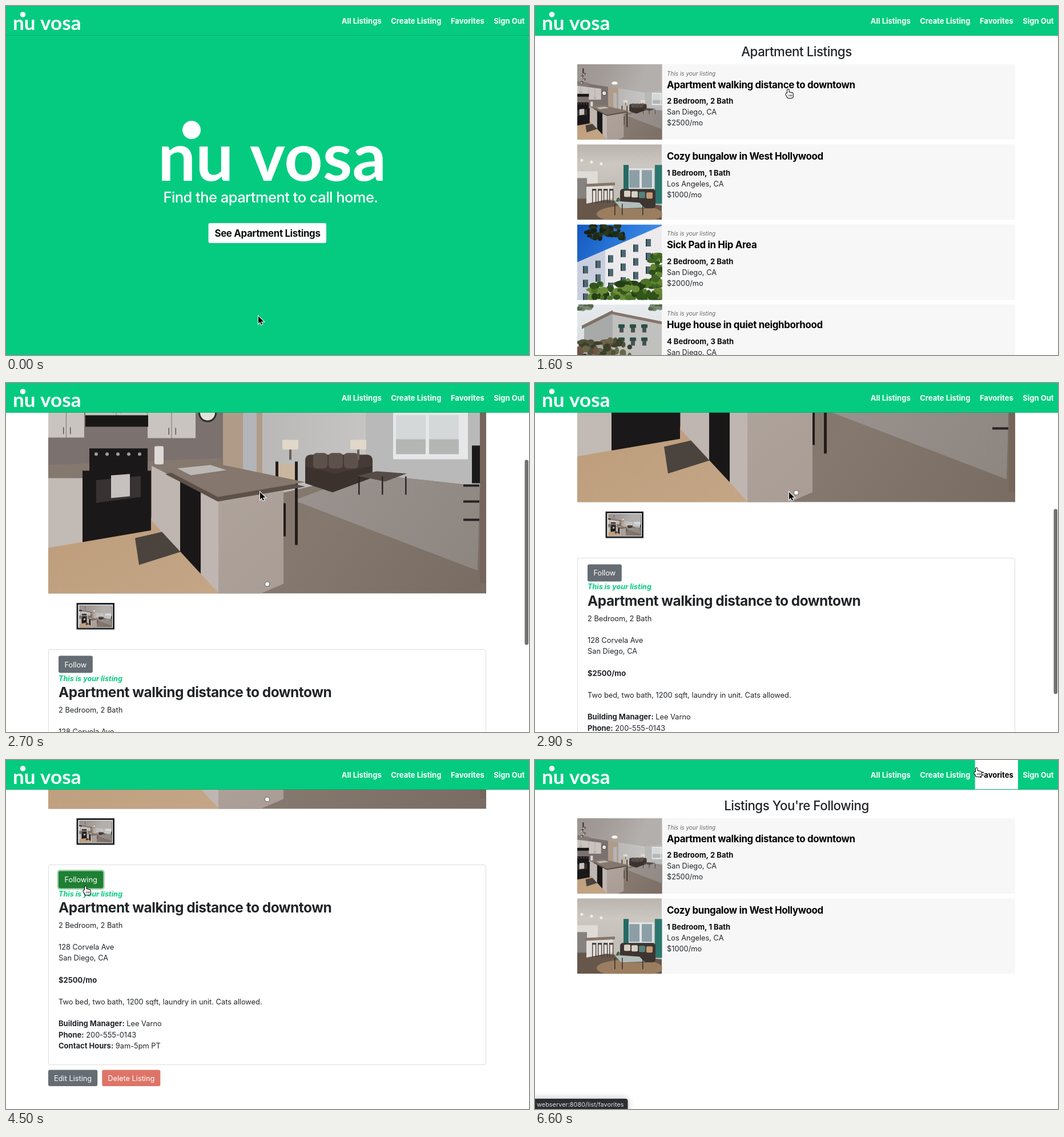
Animation of 916 by 611 pixels, one loop 6900 ms. Source, as an HTML page with a canvas:

```html
<!DOCTYPE html>
<html lang="en">
<head>
<meta charset="utf-8">
<title>Apartment listings walkthrough</title>
<style>
  html, body { margin: 0; width: 100%; height: 100%; overflow: hidden; background: #fff; }
  canvas { display: block; width: 916px; height: 611px; }
</style>
</head>
<body>
<canvas id="stage" width="916" height="611"></canvas>
<script>
const ctx = document.getElementById('stage').getContext('2d');
const W = 916, H = 611, MID = 458;
const LOOP = 6900, TICK = 100, SCROLL_END = 528;
const GREEN = '#04cb80', INK = '#212529', GRAY = '#656c73';

// ---------- drawing helpers ----------
function rect(fill, x, y, w, h, r = 0) {
  ctx.fillStyle = fill;
  ctx.beginPath();
  ctx.roundRect(x, y, w, h, r);
  ctx.fill();
}

function poly(fill, ...pts) {
  ctx.fillStyle = fill;
  ctx.beginPath();
  for (let i = 0; i < pts.length; i += 2) ctx.lineTo(pts[i], pts[i + 1]);
  ctx.fill();
}

function oval(fill, x, y, rx, ry = rx) {
  ctx.fillStyle = fill;
  ctx.beginPath();
  ctx.ellipse(x, y, rx, ry, 0, 0, Math.PI * 2);
  ctx.fill();
}

// Edges are functions of x; a slab is the area between two of them.
const slope = (y, k = 0) => x => y + k * x;
const slab = (fill, x0, x1, top, bottom) =>
  poly(fill, x0, top(x0), x1, top(x1), x1, bottom(x1), x0, bottom(x0));

function fade(w, h, ...colors) {
  const g = ctx.createLinearGradient(0, 0, w, h);
  colors.forEach((c, i) => g.addColorStop(i / (colors.length - 1), c));
  return g;
}

function leaves(colors, count, x, y, w, h, size) {
  let seed = count * 9973;
  const rnd = () => (seed = seed * 16807 % 2147483647) / 2147483647;
  for (let i = 0; i < count; i++) {
    oval(colors[i % colors.length], x + rnd() * w, y + rnd() * h, size * (0.5 + rnd()), size * (0.4 + rnd() * 0.7));
  }
}

// Draws text centred on cy by cap height and returns its width.
function text(str, x, cy, { size = 12.8, weight = 400, color = INK, align = 'left', style = 'normal', track = 0 } = {}) {
  ctx.font = `${style} ${weight} ${size}px Inter, sans-serif`;
  ctx.letterSpacing = `${track * size}px`;
  ctx.textAlign = align;
  ctx.fillStyle = color;
  ctx.fillText(str, x, cy + size * 0.36);
  const width = ctx.measureText(str).width;
  ctx.letterSpacing = '0px';
  return width;
}

const display = (str, x, y, size, options) => text(str, x, y, { size, weight: 700, track: -0.02, ...options });
const heading = (str, y) => display(str, MID, y, 22.3, { weight: 500, align: 'center' });
const strong = (str, x, y, color = INK) => text(str, x, y, { size: 13, weight: 700, color });

function photo(draw, x, y, w, h, scale = 1, shift = 0) {
  ctx.save();
  ctx.beginPath();
  ctx.rect(x, y, w, h);
  ctx.clip();
  ctx.translate(x - shift, y);
  ctx.scale(scale, scale);
  draw();
  ctx.restore();
}

// ---------- photos ----------
function kitchen() {
  const eave = slope(105, 0.157), skirting = slope(432, -0.232);
  const toe = slope(433, -0.17), backSkirting = slope(242, 0.11);

  // shell of the room
  rect(fade(500, 200, '#9a928e', '#a29b97', '#b3afac'), 0, 0, 767, 513);
  rect(fade(767, 513, '#81746a', '#81746a', '#85786e', '#786c63'), 0, 310, 767, 203);
  poly(fade(300, 513, '#b3906d', '#c4a686'), 0, 400, 180, 380, 300, 490, 300, 513, 0, 513);
  slab('#7b716e', 0, 306, eave, slope(310));
  slab('#2c2423', 0, 66, eave, slope(140));
  slab('#857a76', 66, 175, slope(100, 0.15), slope(158));
  slab('#b09b89', 306, 375, eave, slope(320));
  rect('#b3b5b8', 341, 195, 24, 110);
  slab(fade(556, 0, '#aaa8a7', '#b3b1b0', '#c6c5c4'), 375, 556, eave, skirting);
  slab('#b9b9ba', 556, 756, slope(253, -0.11), backSkirting);
  poly(fade(767, 470, '#aaa39f', '#9d9692', '#8d8580'), 430, 350, 556, 303, 756, 325, 752, 473);
  rect('#75655a', 756, 33, 11, 462);

  // window
  rect('#e6e7e8', 604, 194, 131, 84);
  for (const x of [609, 667]) {
    rect('#d5d8d8', x, 201, 52, 68);
    rect('#b4b6b4', x, 243, 52, 26);
  }

  // wall cabinets, two doors each
  for (const [x, end, bottom] of [[0, 64, 240], [65, 174, 203], [174, 259, 241]]) {
    const half = (end - x) / 2;
    for (const left of [x, x + half]) slab('#c9c4c0', left, left + half - 1, slope(133, 0.13), slope(bottom));
    for (const side of [-6, 6]) rect('#5c5552', x + half + side, bottom - 18, 1.5, 12);
  }
  rect('#191616', 65, 201, 110, 20);

  // counter, base units and stove
  slab('#85786f', 0, 304, slope(288, -0.04), slope(312, -0.06));
  slab('#c2bab5', 0, 60, slope(311), toe);
  rect('#dcd9d6', 186, 255, 16, 32, 3);
  slab('#1b1819', 60, 180, slope(298), toe);
  rect('#1b1819', 72, 259, 102, 40);
  for (let i = 0; i < 5; i++) oval('#a29b98', 84 + i * 19, 269, 3);
  slab('#383332', 84, 162, slope(322, -0.09), slope(365, -0.13));
  slab('#c6c1be', 110, 143, slope(315, -0.08), slope(357, -0.1));
  poly('#4b433d', 152, 416, 213, 402, 232, 440, 159, 463);

  // sofa, lamps, table and television
  rect('#453a35', 450, 270, 118, 40, 9);
  poly('#3b322e', 450, 290, 500, 303, 567, 290, 563, 312, 498, 336, 450, 320);
  for (let i = 0; i < 3; i++) rect('#5c514b', 464 + i * 27, 267, 25, 27, 6);
  for (const x of [424, 543]) {
    rect('#e2d8c9', x - 14, 244, 28, 17, 2);
    rect('#6d5f58', x - 2, 261, 4, 18);
  }
  poly('#554c48', 541, 307, 575, 299, 628, 303, 590, 317);
  for (let i = 0; i < 3; i++) rect('#2c2626', 543 + i * 41, 308, 2.5, 32);
  rect('#1b1a1b', 742, 254, 14, 66);
  for (const y of [322, 350, 382]) slab('#272223', 727, 755, slope(y), slope(y + 4));

  // chair behind the island
  rect('#c9b69f', 402, 286, 33, 28);
  for (const x of [398, 432]) rect('#221c1b', x, 282, 5, x > 400 ? 146 : 40);
  rect('#221c1b', 412, 355, 4, 58);

  // island
  const rim = slope(197, 0.51), base = slope(190, 1.08);
  slab('#bfb6b1', 181, 298, rim, base);
  slab('#1a1718', 231, 267, rim, base);
  slab(fade(412, 500, '#bab0a9', '#a99d96'), 298, 412, slope(410, -0.2), slope(673, -0.43));
  for (const [color, drop] of [['#5c5049', 8], ['#85776d', 0]]) {
    poly(color, 205, 296 + drop, 292, 285, 450, 318 + drop, 297, 344 + drop);
  }
  poly('#bdb8b4', 226, 294, 284, 288, 312, 297, 250, 306);

  // light fittings and clock
  oval('#e9dfd2', 350, 129, 21, 11);
  oval('#fff9ee', 350, 126, 17, 7);
  rect('#332d2b', 132, 28, 8, 50);
  for (let i = 0; i < 4; i++) {
    const x = i % 2 ? 128 : 143, y = 65 + i * 19;
    oval('#6a615b', x, y, 11, 9);
    oval('#e6ddd0', x - 4, y + 4, 5, 4);
  }
  oval('#302b2a', 279, 197, 16);
  oval('#e5e1dd', 279, 197, 13);
}

function lounge() {
  rect(fade(0, 70, '#bab4ae', '#ccc7c1', '#c4beb8'), 0, 0, 148, 132);
  slab('#67574b', 0, 148, slope(92, 0.1), slope(132));
  rect('#dfdbd6', 0, 47, 36, 24);
  rect('#85827f', 0, 59, 17, 36);
  slab('#e1ddd8', 16, 62, slope(71, -0.06), slope(107, -0.2));
  slab('#86776a', 14, 66, slope(70, -0.05), slope(75, -0.05));
  for (let x = 26; x < 60; x += 10) {
    rect('#433a35', x, 78, 7, 3);
    for (const leg of [0, 6]) rect('#433a35', x + leg, 78, 1.3, 25);
  }
  for (let i = 0; i < 3; i++) oval('#f5eee1', 8 + i * 17, 28 + i * 3, 2.5);
  rect('#e2e5e5', 88, 42, 46, 36);
  for (const x of [91, 113]) rect('#8c9fa7', x, 45, 18, 31);
  for (const x of [81, 136]) rect(fade(148, 0, '#1d5b55', '#2b786f'), x, 36, x - 72, 68);
  oval('#9b7e60', 92, 122, 58, 15);
  rect('#3d3531', 75, 78, 62, 34, 5);
  ['#d8cfc2', '#d8cfc2', '#56807b', '#c89a78'].forEach((color, i) => rect(color, 82 + i * 13, 81 + i, 11, 11, 2));
  poly('#b3bebc', 65, 99, 109, 102, 118, 111, 77, 112);
  for (const x of [65, 78, 114]) rect('#332e2b', x, 104, 1.5, 20);
  leaves(['#41613d'], 5, 70, 94, 5, 5, 2);
}

function villa() {
  const roof = slope(66, -0.43), sky = fade(148, 80, '#1559bd', '#2b79dc', '#5499e7');
  rect(sky, 0, 0, 148, 132);
  slab('#c9cede', 0, 49, roof, slope(132));
  slab('#eceaed', 49, 148, roof, slope(132));
  for (let i = 0; i < 18; i++) {
    const x = 12 + i % 6 * 22, y = roof(x) + 12 + Math.floor(i / 6) * 24;
    rect('#4f6870', x, y, 7, 13);
    rect('#243f3d', x - 2, y, 2, 13);
  }
  leaves(['#1d2b19', '#29371d', '#182114'], 42, 17, 2, 64, 24, 5);
  leaves(['#32551a', '#4d7425', '#253f15', '#6b8c38'], 85, 25, 100, 120, 32, 7);
  leaves(['#2e501b', '#63832f', '#3f6522'], 45, 130, 52, 20, 80, 6);
}

function house() {
  rect(fade(0, 90, '#e7ebed', '#d5dadd'), 0, 0, 148, 132);
  slab('#a7aaa9', 12, 62, slope(44, -0.5), slope(132));
  slab('#c0c1be', 62, 148, slope(4, 0.2), slope(132));
  slab('#7f7069', 8, 62, slope(41, -0.5), slope(47, -0.5));
  slab('#85746a', 62, 148, slope(0, 0.2), slope(5, 0.2));
  for (let i = 0; i < 6; i++) {
    const x = 74 + i % 3 * 20, y = 35 + Math.floor(i / 3) * 23;
    rect('#4a5150', x, y, 7, 14);
    rect('#284f48', x - 2, y, 11, 6);
  }
  for (const x of [0, 125]) leaves(['#53664c', '#7a8874'], 16, x, 0, 24, 8, 4);
  leaves(['#52503a', '#3c3f2a', '#6a6748', '#705443'], 70, 0, 60, 92, 50, 7);
}

// ---------- interface ----------
function logo(x, y, scale) {
  ctx.save();
  ctx.translate(x, y);
  ctx.scale(scale, scale);
  oval('#fff', 72, 15, 16);
  ctx.font = '700 117.5px Lato, sans-serif';
  ctx.textAlign = 'left';
  ctx.fillText('nu vosa', 13, 104);
  ctx.restore();
}

function header(favoritesHover) {
  const gap = 16.5;
  rect(GREEN, 0, 0, W, 52);
  logo(8, 10.5, 0.299);
  let right = 908.5;
  for (const label of ['Sign Out', 'Favorites', 'Create Listing', 'All Listings']) {
    const lit = favoritesHover && label === 'Favorites';
    ctx.font = '700 13px Inter, sans-serif';
    const left = right - ctx.measureText(label).width;
    if (lit) rect('#fff', left - gap / 2, 0, right - left + gap, 51);
    strong(label, left, 26, lit ? '#000' : '#fff');
    right = left - gap;
  }
  rect('rgba(0,0,0,.14)', 0, 51, W, 1);
}

function button(label, fill, x, y, h, pad, glow) {
  ctx.font = '400 12.8px Inter, sans-serif';
  const w = ctx.measureText(label).width + pad * 2;
  if (glow) rect(glow, x - 2.5, y - 2.5, w + 5, h + 5, 5);
  rect(fill, x, y, w, h, 3);
  text(label, x + pad, y + h / 2 + 0.3, { color: '#fff' });
  return x + w;
}

function home() {
  rect(GREEN, 0, 0, W, H);
  header(false);
  logo(253, 202, 1);
  display('Find the apartment to call home.', 463.5, 335, 25.45, { weight: 500, color: '#fff', align: 'center' });
  rect('#fff', 354.5, 380, 206.5, 35, 3);
  display('See Apartment Listings', MID, 397.5, 16.85, { color: '#0c0f11', align: 'center' });
}

const listings = [
  { draw: kitchen, scale: 132 / 513, shift: 24.6, own: true, title: 'Apartment walking distance to downtown', rooms: '2 Bedroom, 2 Bath', city: 'San Diego, CA', price: '$2500/mo' },
  { draw: lounge, title: 'Cozy bungalow in West Hollywood', rooms: '1 Bedroom, 1 Bath', city: 'Los Angeles, CA', price: '$1000/mo' },
  { draw: villa, own: true, title: 'Sick Pad in Hip Area', rooms: '2 Bedroom, 2 Bath', city: 'San Diego, CA', price: '$2000/mo' },
  { draw: house, own: true, title: 'Huge house in quiet neighborhood', rooms: '4 Bedroom, 3 Bath', city: 'San Diego, CA', price: '$4000/mo' }
];

function listPage(title, count) {
  heading(title, 80);
  listings.slice(0, count).forEach((item, i) => {
    const top = 102 + i * 140.2, y = item.own ? top : top - 14.5;
    rect('#f7f7f7', 74, top, 767, 132);
    photo(item.draw, 74, top, 148.5, 132, item.scale, item.shift);
    if (item.own) text('This is your listing', 231, top + 16, { size: 10, style: 'italic', color: '#6a6a6a' });
    display(item.title, 231, y + 35.5, 16.85, { color: '#000' });
    strong(item.rooms, 231, y + 64.5, '#0b0b0b');
    text(item.city, 231, y + 83.5);
    text(item.price, 231, y + 102.5);
  });
}

// Each line is a bold part followed by a regular part.
const details = [
  ['', '2 Bedroom, 2 Bath'], [],
  ['', '128 Corvela Ave'], ['', 'San Diego, CA'], [],
  ['$2500/mo'], [],
  ['', 'Two bed, two bath, 1200 sqft, laundry in unit. Cats allowed.'], [],
  ['Building Manager:', 'Lee Varno'], ['Phone:', '200-555-0143'], ['Contact Hours:', '9am-5pm PT']
];

function profilePage(scroll, following, hover) {
  ctx.save();
  ctx.translate(0, SCROLL_END - scroll);
  heading('Apartment Profile', 79 - SCROLL_END);
  photo(kitchen, 74, 100.5 - SCROLL_END, 767, 513);
  ctx.shadowColor = '#000';
  ctx.shadowBlur = 2;
  text('1 of 1', 838, 112 - SCROLL_END, { size: 8.6, color: '#fff', align: 'right' });
  oval('#fff', 457.5, 69, 3.5);
  ctx.shadowBlur = 0;

  rect(INK, 123.5, 102, 66.5, 46.5);
  rect('#fff', 126.5, 105, 60.5, 40.5);
  photo(kitchen, 128, 106, 58, 38.5, 58 / 767);

  rect('#dedede', 74, 183, 767, 351, 4);
  rect('#fff', 75, 184, 765, 349, 3);
  if (following) button('Following', hover ? '#1f7f33' : '#28a745', 92, 194.5, 30, 10.5, '#a3d6ae');
  else button('Follow', hover ? '#5a6268' : GRAY, 92, 194.5, 30, 10.5);
  text('This is your listing', 92, 234, { size: 12.6, weight: 700, style: 'italic', color: GREEN });
  display(listings[0].title, 92, 258.5, 24.45);
  details.forEach(([bold, plain], i) => {
    const y = 289 + i * 19.2;
    const indent = bold ? strong(bold, 92, y) + 3.6 : 0;
    if (plain) text(plain, 92 + indent, y);
  });
  const editEnd = button('Edit Listing', GRAY, 74, 542.5, 28.5, 10);
  button('Delete Listing', '#de7468', editEnd + 8, 542.5, 28.5, 10);
  ctx.restore();
}

function statusBar() {
  ctx.shadowColor = 'rgba(0,0,0,.3)';
  ctx.shadowBlur = 12;
  rect('#2b2e31', -5, 593, 167.5, 24, 4);
  ctx.shadowBlur = 0;
  text('webserver:8080/list/favorites', 3, 603, { size: 10.95, color: '#dcdee0' });
}

const ARROW = new Path2D('M0 0V13L3 10L5 15L7 14L5 9.500H9.500Z');
const HAND = new Path2D();
HAND.roundRect(-1, 0, 2.6, 11, 1.3);
for (let i = 0; i < 3; i++) HAND.roundRect(1.4 + i * 2.4, 5 + i * 0.6, 2.5, 8, 1.2);
HAND.roundRect(-1.5, 8, 10, 7, 3);
HAND.roundRect(-3.5, 7, 3, 4, 1.4);

function pointer(x, y, hand) {
  const shape = hand ? HAND : ARROW;
  ctx.save();
  ctx.translate(x, y);
  ctx.lineWidth = 2;
  ctx.strokeStyle = hand ? '#000' : '#fff';
  ctx.fillStyle = hand ? '#fff' : '#000';
  ctx.stroke(shape);
  ctx.fill(shape);
  if (hand) for (let i = 0; i < 3; i++) rect('#000', 1.5 + i * 2.4, 9, 0.8, 3.5);
  ctx.restore();
}

// ---------- timeline ----------
const START = [442, 543];
const moves = [
  { from: 400, to: 800, spot: [444, 398] },
  { from: 1100, to: 1600, spot: [443, 146] },
  { from: 1800, to: 2300, spot: [445, 191] },
  { from: 3700, to: 4400, spot: [139, 221] },
  { from: 4700, to: 5600, spot: [773, 14] }
];

const progress = (t, from, to) => Math.min(1, Math.max(0, (t - from) / (to - from)));

function pointerAt(t) {
  return moves.reduce((pos, { from, to, spot }) => {
    const u = progress(t, from, to), eased = u * u * (3 - 2 * u);
    return pos.map((p, i) => p + (spot[i] - p) * eased);
  }, START);
}

const scrollAt = t => SCROLL_END * (1 - Math.pow(1 - progress(t, 2500, 3400), 2.48));

function render(t) {
  const [x, y] = pointerAt(t);
  const over = (left, top, right, bottom) => x >= left && x <= right && y >= top && y <= bottom;
  const navHover = over(769, 0, 844, 51);
  let hand = navHover;

  rect('#fff', 0, 0, W, H);
  if (t < 1100) {
    home();
    hand = over(354, 380, 561, 415);
  } else if (t < 1900) {
    listPage('Apartment Listings', 4);
    header(false);
    hand = over(231, 127, 560, 149);
  } else if (t < 5700) {
    const scroll = scrollAt(t), following = t >= 4500;
    const buttonHover = over(92, 194, following ? 171 : 152, 225);
    profilePage(scroll, following, buttonHover);
    header(navHover);
    if (t >= 2600 && t < 4000) rect('#717171', 908.5, 3 + scroll * 0.5366, 6.5, 324, 3.2);
    hand = navHover || buttonHover;
  } else {
    listPage("Listings You're Following", 2);
    header(navHover);
  }
  if (navHover && t >= 5600) statusBar();
  pointer(x, y, hand);
}

let shown = -1;
function tick(now) {
  const t = Math.floor(now % LOOP / TICK) * TICK;
  if (t !== shown) render(shown = t);
  requestAnimationFrame(tick);
}
render(0);
requestAnimationFrame(tick);
</script>
</body>
</html>
```
